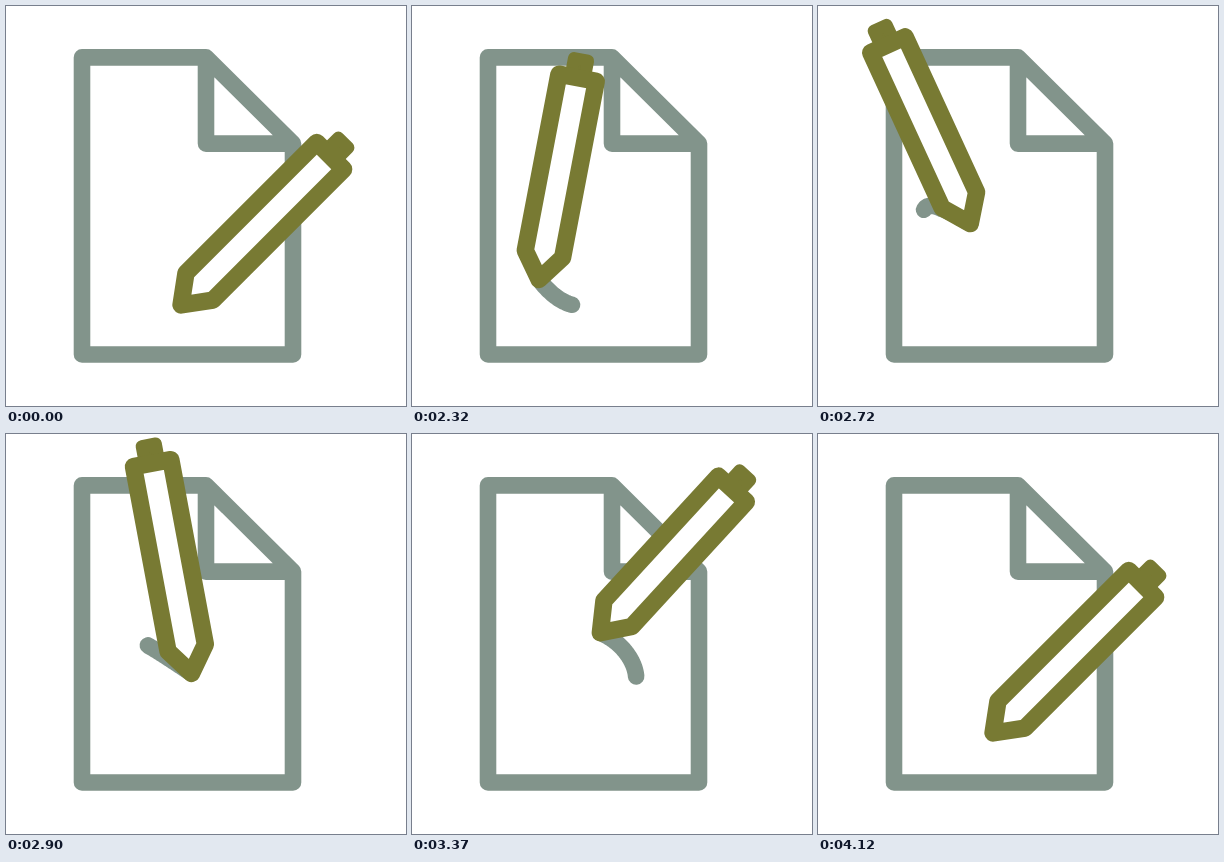
Recreate the animation shown at these times as an HTML page. Size 400 by 400 pixels, loop 4150 ms.

```html
<!DOCTYPE html>
<html>
<head>
<meta charset="utf-8">
<style>
  html, body { margin: 0; height: 100%; overflow: hidden; background: #fff; }
  svg { display: block; width: 100vw; height: 100vh; }
  path { fill: none; stroke-width: 16.6; stroke-linecap: round; stroke-linejoin: round; }
  .paper path { stroke: #82948b; }
  #pen path { stroke: #787a33; stroke-width: 17.4; fill: #fff; }
  #pen .cap { fill: #787a33; stroke-width: 12.4; }
</style>
</head>
<body>
<svg viewBox="0 0 400 400">
  <g class="paper">
    <path d="M76 51.4H200L287 137.6V348.5H76ZM200 51.4V137.6H287"/>
    <path id="trail"/>
  </g>
  <g id="pen">
    <path class="cap" id="cap"/>
    <path id="body"/>
  </g>
</svg>
<script>
const LOOP = 4150, START = 2020, END = 4110;
const INK_START = 2173, INK_LIFE = 235;

const linear = u => u;
const speedUp = u => u ** 1.9;
const slowDown = u => 1 - (1 - u) ** 1.6;

// The scribble, drawn as four strokes one after another
const strokes = [
  stroke(START, 2485, speedUp, 'M176 299C138 308 104 245 104 216Q104 209 106 204'),
  stroke(2485, 3050, linear, 'M106 204C109 198 116 199 124 203C142 209 166 227 213 257.5'),
  stroke(3050, 3435, linear, 'M213 257.5C236 258 224 204 173 194'),
  stroke(3435, END, slowDown, 'M173 194C160 184 164 200 172 215C186 246 194 270 175 299')
];

// Turning points: time, value
const leanKeys = [[START, 45], [2640, -26.5], [3516, 48], [END, 45]];
const barrelKeys = [[2250, 185], [2540, 148], [2870, 188], [3050, 187], [3290, 167], [3660, 185]];

function stroke(from, to, ease, d) {
  const path = document.createElementNS('http://www.w3.org/2000/svg', 'path');
  path.setAttribute('d', d);
  const length = path.getTotalLength();
  return { to, at: t => path.getPointAtLength(length * ease((t - from) / (to - from))) };
}

const tipAt = t => strokes.find(s => t <= s.to).at(t);

// Eases from each turning point to the next
function tween(keys, t) {
  let value = keys[0][1];
  for (let i = 1; i < keys.length; i++) {
    const [from, a] = keys[i - 1], [to, b] = keys[i];
    const u = Math.min(1, Math.max(0, (t - from) / (to - from)));
    value += (b - a) * u * u * (3 - 2 * u);
  }
  return value;
}

const byId = id => document.getElementById(id);
const setPath = (id, d) => byId(id).setAttribute('d', d);

function draw(time) {
  const moving = time >= START && time < END;
  const t = moving ? time : END;
  const tip = tipAt(t), lean = tween(leanKeys, t);
  const top = -26 - tween(barrelKeys, t);

  const ink = [];
  if (moving && t > INK_START) {
    for (let s = Math.max(INK_START, t - INK_LIFE); s < t; s += 5) ink.push(tipAt(s));
    ink.push(tip);
  }
  setPath('trail', ink.map((p, i) => `${i ? 'L' : 'M'}${p.x} ${p.y}`).join(''));
  setPath('body', `M0 0L-19 -26V${top}H19V-26Z`);
  setPath('cap', `M-7 ${top}V${top - 18.5}H7V${top}Z`);
  byId('pen').setAttribute('transform', `translate(${tip.x} ${tip.y}) rotate(${lean})`);
}

const begin = performance.now();
function frame() {
  draw((performance.now() - begin) % LOOP);
  requestAnimationFrame(frame);
}
frame();
</script>
</body>
</html>
```
